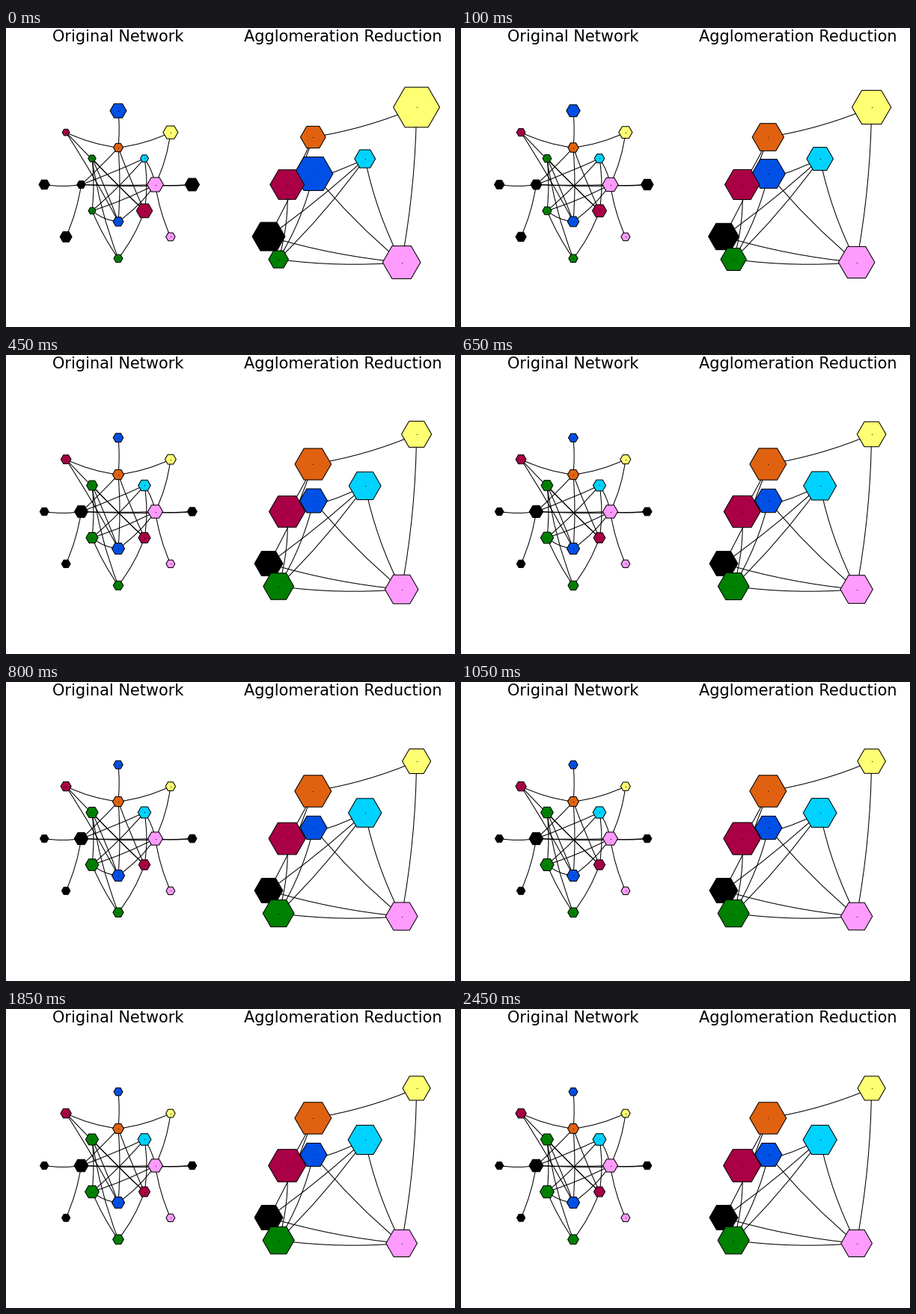
These frames come from a looping animation (600 by 400 pixels, 2500 ms). A matplotlib script:

```python
import numpy as np
import matplotlib.pyplot as plt
from matplotlib.animation import FuncAnimation
from matplotlib.patches import PathPatch, Polygon
from matplotlib.path import Path

W, H, DPI = 600, 400, 100
FRAMES, INTERVAL = 50, 50
PX = 72 / DPI
FAST, SLOW = 0.35, 0.12   # decay rates per frame
MID = 5                   # frame of the middle width

BLUE, CRIMSON, ORANGE, YELLOW = "#0050e6", "#aa0046", "#e06210", "#ffff73"
GREEN, CYAN, PINK, BLACK = "#008000", "#00d2ff", "#ff9bff", "#000000"


def ring(radius, step):
    """Point on a circle of the left network, in eighths clockwise from the top."""
    a = step * np.pi / 4
    return 150 + radius * np.sin(a), 209.5 - radius * np.cos(a)


def inner(step):
    return ring(49.5, step)


def outer(step):
    return ring(98.8, step)


# name: (position, colour, width at start, middle and end)
LEFT = {
    "o0": (outer(0), BLUE, 23, 16.5, 13),
    "o1": (outer(1), YELLOW, 21, 17.5, 13.5),
    "o2": (outer(2), BLACK, 20.5, 15.3, 13),
    "o3": (outer(3), PINK, 13.5, 13, 13),
    "o4": (outer(4), GREEN, 13, 14, 15.8),
    "o5": (outer(5), BLACK, 17, 13.8, 12.3),
    "o6": (outer(6), BLACK, 15.5, 13.5, 12.3),
    "o7": (outer(7), CRIMSON, 11, 14, 15.5),
    "i0": (inner(0), ORANGE, 14, 16.2, 16),
    "i1": (inner(1), CYAN, 12, 16.5, 19),
    "i2": (inner(2), PINK, 23, 21.5, 21),
    "i3": (inner(3), CRIMSON, 22.5, 18.3, 16.2),
    "i4": (inner(4), BLUE, 15, 17.7, 18.3),
    "i5": (inner(5), GREEN, 11, 15.5, 20),
    "i6": (inner(6), BLACK, 12.5, 18, 20),
    "i7": (inner(7), GREEN, 11.5, 14.5, 18.3),
}

RIGHT = {
    "black": ((351, 279), BLACK, 45, 39.8, 39),
    "blue": ((411, 195), BLUE, 53, 40.5, 37),
    "orange": ((410.3, 146), ORANGE, 34.8, 48, 50),
    "yellow": ((548.6, 106), YELLOW, 63, 45.5, 38.2),
    "cyan": ((479.7, 175), CYAN, 29, 41.5, 46.3),
    "crimson": ((375.7, 209.5), CRIMSON, 46.8, 48.3, 51.2),
    "green": ((364.2, 309.5), GREEN, 27.7, 40, 43.3),
    "pink": ((528.6, 313.5), PINK, 51.8, 47.5, 42.7),
}

# from, to, sideways bend in pixels
LEFT_EDGES = [
    ("o0", "i0", -1.2), ("o7", "i0", 3), ("o1", "i0", -3), ("o1", "i2", -3),
    ("o6", "i6", 2), ("i6", "o5", -2.5), ("i2", "o2", 1.5), ("i2", "o3", 2.5),
    ("i7", "o4", 4), ("i5", "o4", 2), ("i3", "o4", -3), ("o7", "i4", -1.5),
    ("o7", "i3", 1), ("i7", "i4", -1), ("i7", "i3", 1), ("i7", "i5", -2),
    ("i6", "i0", 1), ("i6", "i1", 1), ("i6", "i2", 1), ("i6", "o2", 2),
    ("i0", "i4", -2), ("i0", "i3", 1), ("i1", "i5", -2), ("i1", "i3", -3),
    ("i1", "i2", -2), ("i2", "i5", -2), ("i2", "i4", -3), ("i5", "i4", 3),
]

RIGHT_EDGES = [
    ("orange", "yellow", 4.5), ("yellow", "pink", -4.5), ("cyan", "pink", 5),
    ("blue", "pink", 4), ("black", "pink", 4.5), ("green", "pink", 4.5),
    ("crimson", "green", -4.5), ("blue", "green", -5), ("cyan", "black", -2.5),
    ("cyan", "green", -4), ("orange", "black", -4), ("orange", "crimson", -2),
    ("cyan", "crimson", -4),
]


def width_at(t, start, mid, end):
    """Let the area relax to its end value as a fast and a slow decay."""
    first, second = start**2 - end**2, mid**2 - end**2
    fast, slow = np.exp(-FAST * MID), np.exp(-SLOW * MID)
    b = (second - fast * first) / (slow - fast)
    a = first - b
    return np.sqrt(end**2 + a * np.exp(-FAST * t) + b * np.exp(-SLOW * t))


ANGLES = np.arange(6) * np.pi / 3
UNIT_HEX = np.column_stack([np.cos(ANGLES), np.sin(ANGLES)]) / 2


def hexagon(pos, width):
    return np.array(pos) + UNIT_HEX * (width - 1.1)


def draw_edges(nodes, edges):
    for a, b, bend in edges:
        p, q = np.array(nodes[a][0]), np.array(nodes[b][0])
        dx, dy = q - p
        normal = np.array([-dy, dx]) / np.hypot(dx, dy)
        control = (p + q) / 2 + 2 * bend * normal
        path = Path([p, control, q], [Path.MOVETO, Path.CURVE3, Path.CURVE3])
        ax.add_patch(PathPatch(path, fill=False, lw=1.05 * PX, zorder=1))


def draw_nodes(nodes):
    parts = []
    for z, (pos, color, *widths) in enumerate(nodes.values()):
        hexa = Polygon(hexagon(pos, widths[0]), facecolor=color,
                       edgecolor="black", lw=1.05 * PX, zorder=2 + z)
        ax.add_patch(hexa)
        ax.plot(*pos, "s", color="black", ms=PX, mew=0, zorder=40)
        parts.append((hexa, pos, widths))
    return parts


fig = plt.figure(figsize=(W / DPI, H / DPI), dpi=DPI, facecolor="white")
ax = fig.add_axes([0, 0, 1, 1])
ax.set(xlim=(0, W), ylim=(H, 0))
ax.axis("off")

for x, title in ((150, "Original Network"), (450.5, "Agglomeration Reduction")):
    ax.text(x, 18, title, fontsize=15, family="DejaVu Sans",
            ha="center", va="baseline")

draw_edges(LEFT, LEFT_EDGES)
draw_edges(RIGHT, RIGHT_EDGES)
hexagons = draw_nodes(LEFT) + draw_nodes(RIGHT)


def update(frame):
    for hexa, pos, widths in hexagons:
        hexa.set_xy(hexagon(pos, width_at(frame, *widths)))
    return [part[0] for part in hexagons]


anim = FuncAnimation(fig, update, frames=FRAMES, interval=INTERVAL,
                     repeat=True, repeat_delay=0)
plt.show()
```
